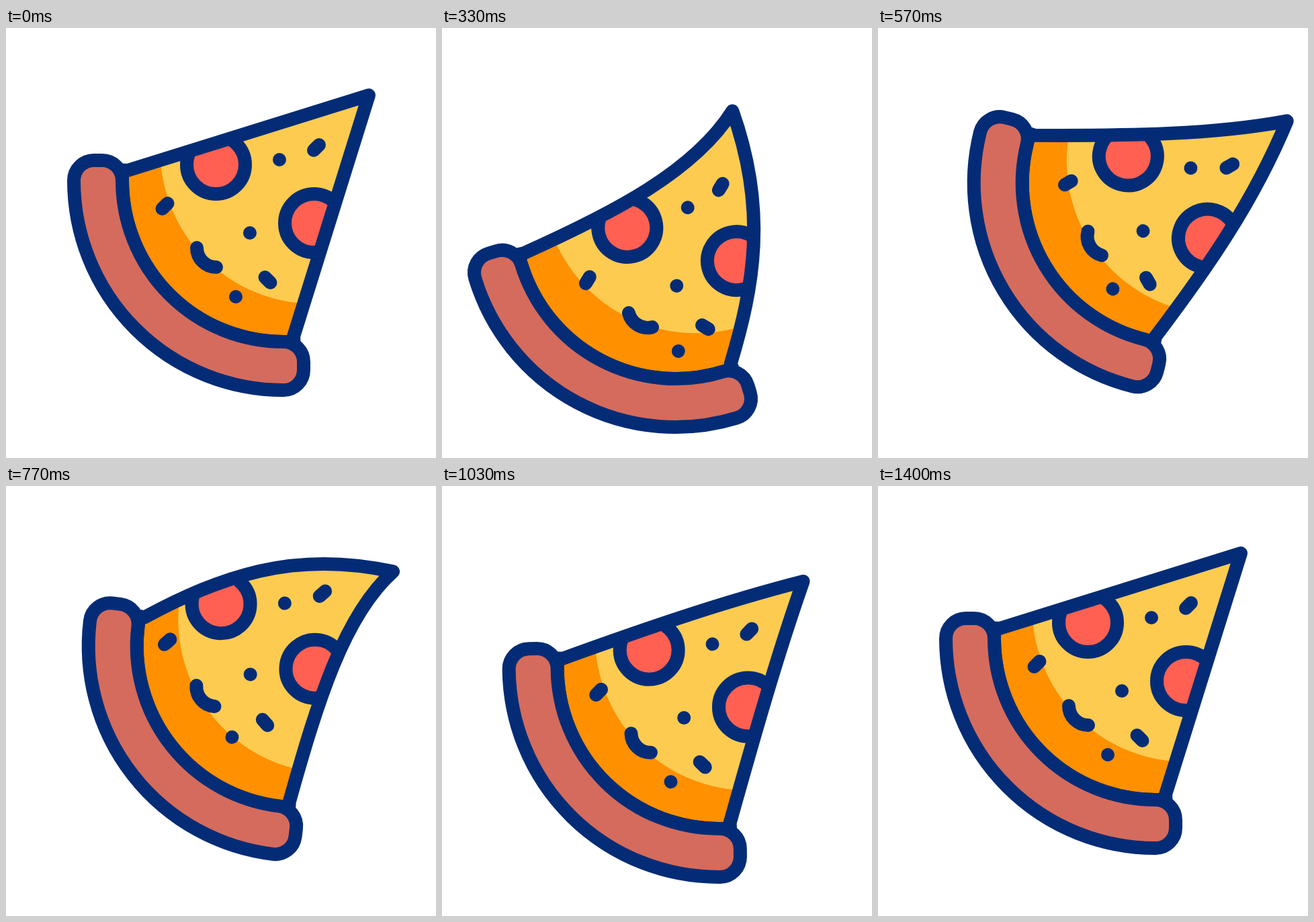
Write an HTML page with a canvas that moves like this. It is 640 px wide and 640 px high and loops after 2 s.

```html
<!DOCTYPE html>
<html lang="en">
<head>
<meta charset="utf-8">
<title>Wobbling pizza slice</title>
<style>
  html, body { margin: 0; overflow: hidden; background: #fff; }
  canvas { display: block; }
</style>
</head>
<body>
<canvas width="640" height="640"></canvas>
<script>
const ctx = document.querySelector('canvas').getContext('2d');
const NAVY = '#042c76', CRUST = '#d56b5c', CHEESE = '#fdcb50', SAUCE = '#ff9000', SALAMI = '#ff6052';
const LOOP = 2000;

// time, crust centre x, y, counterclockwise tilt, sideways bend, lengthwise bend
const keys = [
  [0, 413, 227, 0, 0, 0],
  [170, 367, 253, 12, 13, 0],
  [260, 336, 279, 19, 26, 0],
  [330, 347.5, 282, 17, 30, 1],
  [570, 454.5, 230.8, -14, 11, 2],
  [640, 465, 228, -17, -8, 4],
  [770, 435, 238, -7, -31, 9],
  [910, 394, 274, 5, -22, 5],
  [1030, 411.5, 270, 0.5, -4, 1],
  [1190, 419, 250, -5, 4, 0],
  [1400, 413, 227, 0, 0, 0],
];

function slope(i, ch) {
  if (i === 0 || i === keys.length - 1) return 0;
  const [a, b, c] = [keys[i - 1], keys[i], keys[i + 1]];
  const h1 = b[0] - a[0], h2 = c[0] - b[0];
  return (h2 * (b[ch] - a[ch]) / h1 + h1 * (c[ch] - b[ch]) / h2) / (h1 + h2);
}

// Smooth Hermite curve through the keys
function pose(t) {
  const next = keys.findIndex(k => k[0] > t);
  if (next < 0) return keys[keys.length - 1].slice(1);
  const a = keys[next - 1], b = keys[next], h = b[0] - a[0], s = (t - a[0]) / h;
  return [1, 2, 3, 4, 5].map(ch => {
    const ease = s * s * (3 - 2 * s);
    return a[ch] + (b[ch] - a[ch]) * ease
      + h * s * (1 - s) * ((1 - s) * slope(next - 1, ch) - s * slope(next, ch));
  });
}

const rad = deg => deg * Math.PI / 180;
const TIP = [127, -127], LEFT = [-232, -15], RIGHT = [15, 232];

function slicePath(bend, stretch) {
  const control = (base, part, amount) => base.map((v, i) =>
    v + (TIP[i] - v) * part + (amount * bend + (i ? -stretch : stretch)) * Math.SQRT1_2);
  const wideL = bend < 0 ? 1.25 : 1, wideR = bend > 0 ? 1.25 : 1;
  const path = new Path2D();
  path.moveTo(...LEFT);
  path.bezierCurveTo(...control(LEFT, 0.35, wideL), ...control(LEFT, 0.68, 1.6 * wideL), ...TIP);
  path.bezierCurveTo(...control(RIGHT, 0.68, 1.6 * wideR), ...control(RIGHT, 0.35, wideR), ...RIGHT);
  path.arc(0, 0, 240, Math.atan2(232, 15), Math.atan2(-15, -232));
  path.closePath();
  return path;
}

const crust = new Path2D(`M-312 0 A30 30 0 0 1 -282 -30 H-270 A30 30 0 0 1 -240 0
  A240 240 0 0 0 0 240 A30 30 0 0 1 30 270 V282 A30 30 0 0 1 0 312 A312 312 0 0 1 -312 0Z`);

// Round dots, short dashes and one curved stroke
const crumbs = new Path2D(`M-6 -31h.01 M-50 78h.01 M-71 173h.01
  M45 -45l8 -8 M-180.5 42l8 -8 M-27.5 144l8 8 M-129 100a29 29 0 0 0 29 29`);

function disc(x, y, r, fill, outlined) {
  ctx.beginPath();
  ctx.arc(x, y, r, 0, 2 * Math.PI);
  ctx.fillStyle = fill;
  ctx.fill();
  if (outlined) ctx.stroke();
}

function draw(t) {
  const [x, y, tilt, bend, stretch] = pose(t);
  ctx.setTransform(1, 0, 0, 1, 0, 0);
  ctx.fillStyle = '#fff';
  ctx.fillRect(0, 0, 640, 640);
  ctx.translate(x, y);
  ctx.rotate(rad(-tilt));
  ctx.strokeStyle = NAVY;
  ctx.lineWidth = 20;
  ctx.lineCap = ctx.lineJoin = 'round';

  const slice = slicePath(bend, stretch);
  ctx.save();
  ctx.clip(slice);
  ctx.fillStyle = SAUCE;
  ctx.fill(slice);
  disc(45, -45, 228.5, CHEESE);
  // Toppings follow the bend and turn slightly with it
  ctx.translate((bend + stretch) * Math.SQRT1_2 - 35, (bend - stretch) * Math.SQRT1_2 + 75);
  ctx.rotate(rad(bend / 10));
  ctx.translate(35, -75);
  disc(-100.5, -23.5, 43.5, SALAMI, true);
  disc(45.5, 63.5, 43.5, SALAMI, true);
  ctx.stroke(crumbs);
  ctx.restore();

  ctx.stroke(slice);
  ctx.fillStyle = CRUST;
  ctx.fill(crust);
  ctx.stroke(crust);
}

const start = performance.now();
function frame() {
  draw((performance.now() - start) % LOOP);
  requestAnimationFrame(frame);
}
frame();
</script>
</body>
</html>
```
